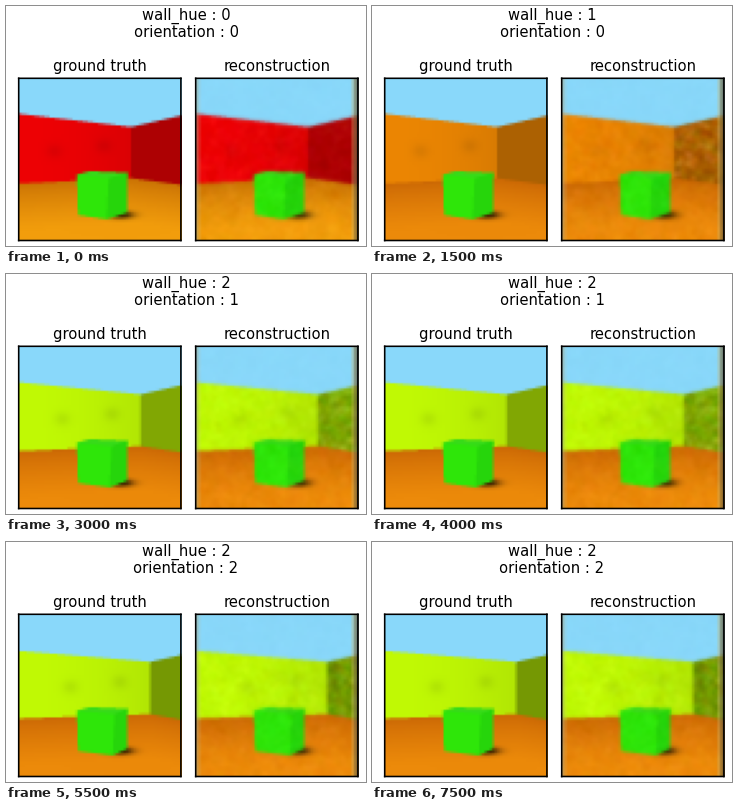
These frames come from a looping animation (360 px wide and 240 px high, 8000 ms). A matplotlib script:

```python
import numpy as np
import matplotlib.pyplot as plt
from matplotlib.animation import FuncAnimation
from matplotlib.path import Path

W, H, DPI = 360, 240, 80
PX = 72 / DPI           # points per pixel
N, SUB = 64, 4          # image size and supersampling
LEFT, RIGHT, TOP, SIDE = 12.7, 189.7, 72.3, 162.2

# (wall_hue, orientation), one pair per half second
STEPS = [(0, 0), (8, 0), (0, 0), (1, 0), (3, 0), (3, 1), (2, 1), (2, 2),
         (2, 1), (2, 2), (1, 2), (2, 2), (2, 1), (2, 2), (1, 2), (2, 2)]

SKY = (137, 216, 250)
WALL = {0: (238, 2, 5), 1: (236, 134, 3), 2: (193, 250, 5),
        3: (64, 232, 7), 8: (200, 4, 246)}
FLOOR = {0: ((200, 112, 4), (242, 157, 12))}
FLOOR_REST = ((202, 103, 5), (236, 138, 10))

axis = (np.arange(N * SUB) + 0.5) / (N * SUB) * SIDE
X, Y = np.meshgrid(LEFT + axis, TOP + axis)
POINTS = np.column_stack([X.ravel(), Y.ravel()])


def inside(*corners):
    return Path(corners).contains_points(POINTS).reshape(X.shape)


def spot(x, y, rx, ry):
    return np.exp(-((X - x) / rx) ** 2 - ((Y - y) / ry) ** 2)


def shrink(a):
    return a.reshape(N, SUB, N, SUB, -1).mean(axis=(1, 3))


def blur(a, times=1):
    for _ in range(times):
        for ax in (0, 1):
            pad = [(1, 1) if i == ax else (0, 0) for i in range(a.ndim)]
            p = np.pad(a, pad, mode="edge")
            lo, mid, hi = (np.take(p, range(k, k + N), axis=ax)
                           for k in range(3))
            a = (lo + 2 * mid + hi) / 4
    return a


def render(hue, turn):
    """Room image and the masks of its wall, right wall and floor."""
    cx = 124.5 + 9.5 * turn
    xs = [13, cx, 175]
    roof = np.interp(X, xs, [109 + turn / 2, 122 - turn / 2, 110.5 + 1.7 * turn])
    base = np.interp(X, xs, [178.3 - turn / 2, 173, 179.7 - turn / 2])
    wall = (Y >= roof) & (Y < base)
    floor = Y >= base
    right = wall & (X > cx)

    img = np.empty(X.shape + (3,))
    img[:] = SKY

    along = np.clip((X - 13) / (cx - 13), 0, 1)
    light = np.where(X > cx, 0.73 - 0.06 * turn, 1 - 0.08 * along ** 2)
    for x, y in ((48, 146), (97, 141)):
        light -= 0.07 * spot(x + 8 * turn, y, 8, 7) * (X < cx)
    paint = light[..., None] * np.array(WALL[hue])
    img[wall] = paint[wall]

    far, near = map(np.array, FLOOR.get(hue, FLOOR_REST))
    depth = np.clip((Y - base) / 45, 0, 1)[..., None] ** 0.7
    ground = far + (near - far) * depth
    ground *= 1 - 0.7 * np.clip(1.4 * spot(114, 209.5, 12, 3.5), 0, 1)[..., None]
    img[floor] = ground[floor]

    ex = 102 + 3 * turn
    a, b, c, d = (70.3, 169.5), (83, 166), (120.8, 167.5), (ex, 173)
    e, f, g = (71.5, 209.7), (ex - 2, 214), (120.3, 207.3)
    img[inside(a, d, f, e)] = (46, 230, 9)
    img[inside(d, c, g, f)] = (38, 213, 11)
    img[inside(a, b, c, d)] = (55, 219, 25)
    return shrink(img), *(shrink(m.astype(float)) for m in (wall, right, floor))


def reconstruct(img, wall, right, floor, hue, turn):
    """Softened, mottled copy with a worn frame at the sides."""
    rng = np.random.default_rng(100 * hue + turn)
    fine = blur(rng.normal(size=(N, N, 1))) * 2
    coarse = np.kron(rng.normal(size=(N // 4, N // 4)), np.ones((4, 4)))
    coarse = blur(coarse[..., None], 2)
    tint = blur(rng.normal(size=(N, N, 3)), 2) * 3
    rough = 1 + 2.5 * wall + 2 * floor + 8 * right * (hue in (1, 2, 3))
    out = 0.5 * (img + blur(img))
    out += rough * (0.6 * fine + 0.6 * coarse + 0.5 * tint)

    def edge(col, colour, mix):
        out[:, col] += mix * (np.array(colour) - out[:, col])

    edge(0, (165, 165, 135), 0.45)
    edge(1, (190, 190, 160), 0.15)
    edge(N - 3, (200, 180, 110), 0.35)
    edge(N - 2, (130, 115, 70), 0.65)
    edge(N - 1, (85, 75, 55), 0.7)
    return out


def to_bytes(a):
    return np.clip(a, 0, 255).astype(np.uint8)


views = {}
for state in sorted(set(STEPS)):
    room = render(*state)
    views[state] = to_bytes(room[0]), to_bytes(reconstruct(*room, *state))

plt.rcParams["font.family"] = "DejaVu Sans"
fig = plt.figure(figsize=(W / DPI, H / DPI), dpi=DPI, facecolor="white")


def label(x, baseline, text=""):
    return fig.text(x / W, 1 - baseline / H, text, fontsize=14.7 * PX,
                    ha="center", va="baseline", color="black")


def panel(x, title):
    ax = fig.add_axes([x / W, 1 - (TOP + SIDE) / H, SIDE / W, SIDE / H])
    ax.set(xticks=[], yticks=[])
    for spine in ax.spines.values():
        spine.set(linewidth=1.6 * PX, snap=False)
    label(x + SIDE / 2, 65, title)
    return ax.imshow(views[STEPS[0]][0], aspect="auto",
                     interpolation="hanning")


panels = [panel(LEFT, "ground truth"), panel(RIGHT, "reconstruction")]
hue_text, turn_text = label(180, 14), label(180, 31)


def update(i):
    hue, turn = STEPS[i]
    hue_text.set_text(f"wall_hue : {hue}")
    turn_text.set_text(f"orientation : {turn}")
    for im, view in zip(panels, views[hue, turn]):
        im.set_data(view)
    return [*panels, hue_text, turn_text]


anim = FuncAnimation(fig, update, frames=len(STEPS), interval=500, repeat=True)
plt.show()
```
